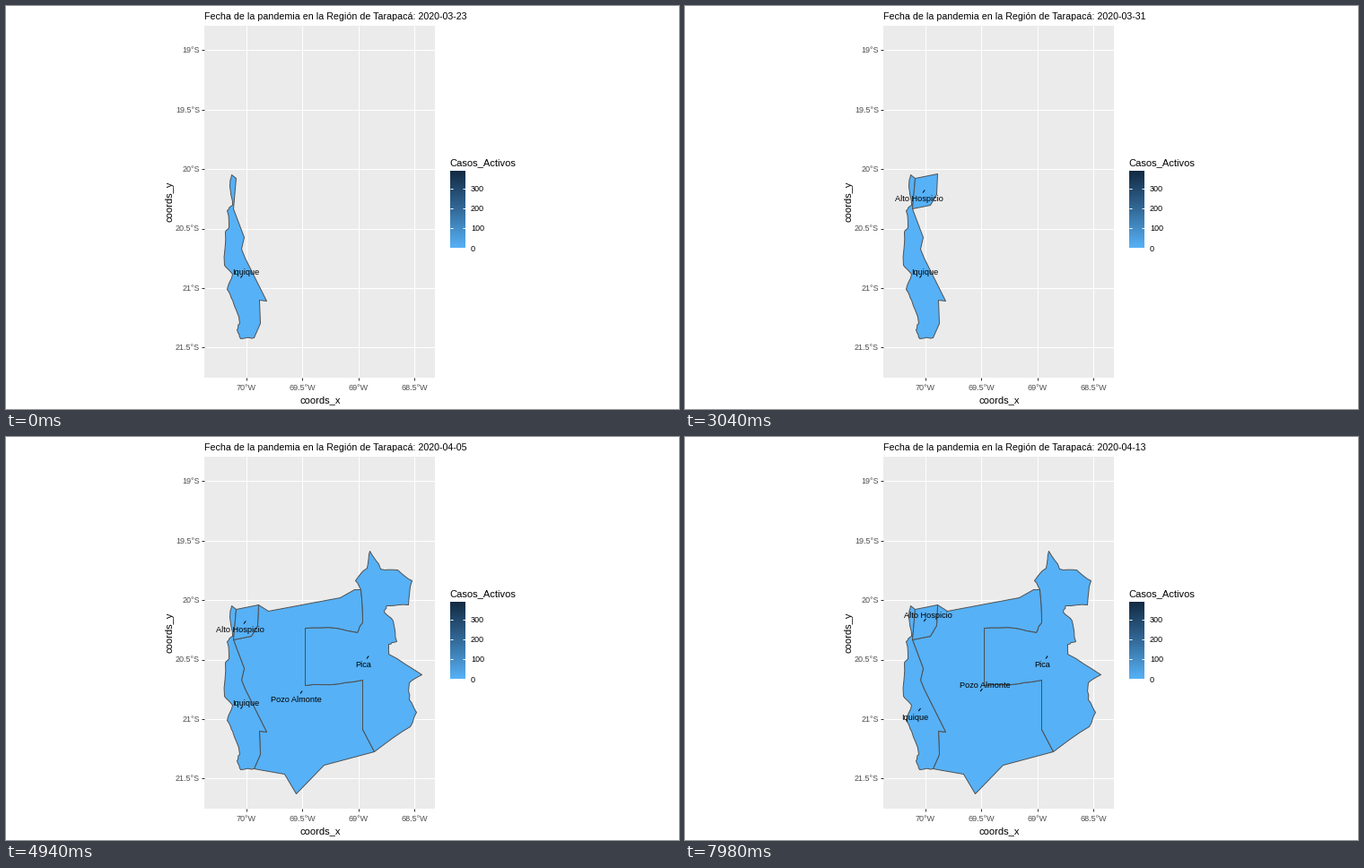
Animation, 750 px wide and 450 px high, one loop 8 s. Source, as a matplotlib script:

```python
import random

import matplotlib.pyplot as plt
import numpy as np
from matplotlib.animation import FuncAnimation
from matplotlib.colors import LinearSegmentedColormap
from matplotlib.patches import Polygon, Rectangle

W, H, DPI = 750, 450, 100
STEP_MS, TICK_MS, LOOP_MS = 380, 20, 8000
PX = 72 / DPI  # points per pixel
FILL, EDGE = "#56B1F7", "#4D4D4D"

plt.rcParams["font.family"] = "Liberation Sans"
fig = plt.figure(figsize=(W / DPI, H / DPI), dpi=DPI, facecolor="white")
ax = fig.add_axes([0, 0, 1, 1])
ax.axis("off")


def text(x, y, s, size, color="black", **kw):
    return ax.text(x, y, s, fontsize=size * PX, color=color, **kw)


def line(xs, ys, color, z=1):
    return ax.plot(xs, ys, color=color, lw=PX, zorder=z,
                   solid_capstyle="butt")[0]


def rough(points, seed, amp=1.0, depth=2):
    """Roughen a polyline by repeated midpoint displacement."""
    rng = random.Random(seed)
    for _ in range(depth):
        out = points[:1]
        for (x0, y0), (x1, y1) in zip(points, points[1:]):
            out += [((x0 + x1) / 2 + rng.uniform(-amp, amp),
                     (y0 + y1) / 2 + rng.uniform(-amp, amp)), (x1, y1)]
        points, amp = out, amp * 0.8
    return points


def region(points, z):
    # Borders are given as pixel indices, so shift them to pixel centres
    return ax.add_patch(Polygon(np.array(points) + 0.5, fc=FILL, ec=EDGE,
                                lw=0.95 * PX, joinstyle="round", zorder=z))


def degrees(value, side):
    return f"{value:g}°{side}"


# Panel, grid and axes
ax.add_patch(Rectangle((221, 22), 257, 393, fc="#EBEBEB", ec="none", zorder=0))
for i in range(4):
    x = 268 + 62.35 * i
    line([x, x], [22, 415], "white")
    line([x, x], [415, 418], "#333333")
    text(x, 429, degrees(70 - i / 2, "W"), 9, "#4D4D4D", ha="center")
for i in range(6):
    y = 49.4 + 66.4 * i
    line([221, 478], [y, y], "white")
    line([218, 221], [y, y], "#333333")
    text(216, y + 2.8, degrees(19 + i / 2, "S"), 9, "#4D4D4D", ha="right")
text(350, 443, "coords_x", 11.1, ha="center")
text(185.5, 218.5, "coords_y", 11.1, ha="center", rotation=90,
     rotation_mode="anchor")

# Legend
ramp = LinearSegmentedColormap.from_list("cases", ["#132B43", "#336A98", FILL])
ax.imshow(np.linspace(0, 1, 86)[:, None], cmap=ramp, aspect="auto",
          extent=(495, 512, 270, 184), interpolation="nearest", zorder=1)
ax.set(xlim=(0, W), ylim=(H, 0))
text(494.3, 178, "Casos_Activos", 11.1)
for i in range(4):
    y = 270.8 - 22.4 * i
    if i:
        line([495, 498.4], [y, y], "white", 2)
        line([508.6, 512], [y, y], "white", 2)
    text(518, y + 3, str(100 * i), 9)

# Key points of the borders; neighbours share theirs
coast = rough([(251, 188), (249, 201), (252, 222), (246, 228), (248, 247),
               (244, 252), (243, 289), (252, 299), (246, 316), (252, 328),
               (260, 354), (257, 361), (261, 371), (276, 370)], 4)
inland = [(276, 370), (283, 354), (282, 328), (290, 329), (266, 281),
          (262, 271), (265, 258), (253, 226)]
strip = [(253, 226), (254, 215), (256, 192)]
hospicio = [(253, 226), (273, 222), (280, 210), (281, 187)]
pica_west = (rough([(395, 170), (397, 207), (391, 218), (367, 213), (333, 213)],
                   2, 0.7)
             + rough([(333, 277), (372, 275), (397, 271)], 3)
             + [(397, 326), (410, 351)])
pica_east = rough([(410, 351), (450, 323), (457, 307), (449, 293), (449, 274),
                   (463, 265), (426, 242), (426, 231), (435, 228), (431, 205),
                   (421, 195), (424, 188), (448, 187), (452, 160), (436, 148),
                   (417, 147), (405, 127), (402, 146), (389, 160), (395, 170)],
                  7)
north = [(281, 187), (292, 194), (372, 179), (388, 170), (395, 170)]
south = [(410, 351), (354, 366), (323, 398), (310, 376), (287, 372), (276, 370)]


class Commune:
    """A map region whose label hops between two spots around its centre."""

    def __init__(self, name, first_day, patch, centre, offset, hop, hopped):
        self.first_day, self.patch, self.hopped = first_day, patch, hopped
        self.centre, self.offset, self.hop = centre, offset, hop
        self.label = text(0, 0, name, 9.2, ha="center", zorder=8)
        self.pointer = line([0, 0], [0, 0], "black", 7)
        self.parts = [patch, self.label, self.pointer]

    def show(self, day):
        for part in self.parts:
            part.set_visible(day >= self.first_day)
        move = self.hop * bool(self.hopped(day))
        x, y = self.centre
        dx, dy = self.offset
        self.label.set_position((x + dx + 10.7 * move, y + dy - 16 * move))
        x, y = x + 1.2 * move, y - 2.5 * move
        self.pointer.set_data([x - 1, x + 1.2], [y + 1.5, y - 1.5])


communes = [
    Commune("Iquique", 0, region(coast + inland + strip, 3),
            (262.5, 302), (4.5, -2), -1, lambda d: d in (2, 12, 18, 21)),
    Commune("Alto Hospicio", 2, region(hospicio + strip[::-1], 4),
            (266, 207), (-5.5, 11), 1,
            lambda d: d % 2 if d < 11 else d % 2 == 0 or d > 16),
    Commune("Pica", 12, region(pica_west + pica_east, 5),
            (403, 246), (-5, 11), 1, lambda d: d in (14, 15, 20)),
    Commune("Pozo Almonte", 13,
            region(north + pica_west + south + inland + hospicio, 2),
            (329, 285), (-5.5, 11), 1, lambda d: d in (16, 18, 21)),
]
title = text(221, 15, "", 10.62)


def date(day):
    month, d = divmod(22 + day, 31)
    return f"2020-{month + 3:02d}-{d + 1:02d}"


def update(tick):
    day = tick * TICK_MS // STEP_MS
    title.set_text(f"Fecha de la pandemia en la Región de Tarapacá: {date(day)}")
    for commune in communes:
        commune.show(day)
    return [title] + [part for c in communes for part in c.parts]


anim = FuncAnimation(fig, update, frames=LOOP_MS // TICK_MS, interval=TICK_MS,
                     init_func=lambda: update(0), repeat=True, repeat_delay=0)
plt.show()
```
